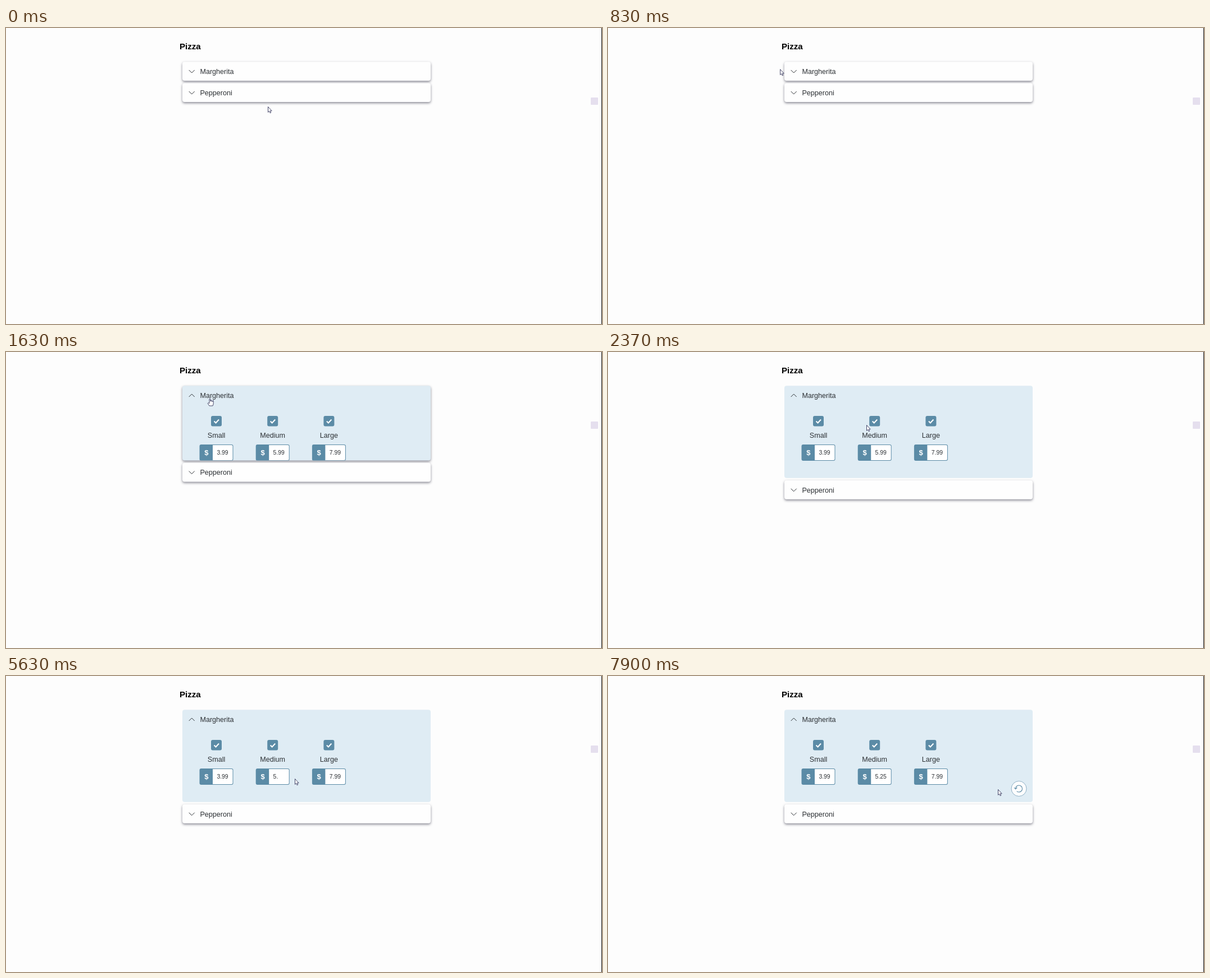
Write an HTML page with a canvas that moves like this. It is 1061 px wide and 528 px high and loops after 8000 ms.

```html
<!DOCTYPE html>
<html lang="en">
<head>
<meta charset="utf-8">
<title>Pizza menu</title>
<style>
html, body { margin: 0; width: 100%; height: 100%; overflow: hidden; background: #fdfdfd; }
canvas { display: block; }
</style>
</head>
<body>
<canvas id="stage" width="1061" height="528"></canvas>
<script>
const ctx = document.getElementById('stage').getContext('2d');
const LOOP = 8000;
const BLUE = '#5b8ba6', INK = '#2c3034';
const SANS = '"Liberation Sans", Arial, sans-serif';

// Keys are [time, value, value, ...], eased between neighbours.
const MOUSE = [
  [400, 466, 140], [600, 299, 72], [760, 299, 72], [1100, 362, 83],
  [1970, 362, 83], [2370, 460, 130], [2500, 466, 150], [2670, 466, 150],
  [2930, 480, 162], [3100, 480, 162], [3630, 496, 170], [3970, 496, 172],
  [4170, 514, 183], [7100, 514, 183], [7330, 650, 202], [7630, 650, 202],
  [7900, 694, 202]
];
const HOVER = [[490, 0], [560, .6], [600, .6], [720, 0], [880, 0], [1030, 1]];
const PRICES = [[0, '5.99'], [5300, '5.9'], [5570, '5.'], [6100, '5.2'], [6570, '5.25']];
const CARET = [[3630, 4500], [5030, 5630], [6100, 6830], [7100, 7630]];

const clamp = x => Math.min(1, Math.max(0, x));
const smooth = x => x * x * (3 - 2 * x);

function track(keys, t) {
  const i = keys.findIndex(k => k[0] > t);
  if (i === 0) return keys[0].slice(1);
  if (i < 0) return keys[keys.length - 1].slice(1);
  const a = keys[i - 1], b = keys[i];
  const p = smooth((t - a[0]) / (b[0] - a[0]));
  return a.slice(1).map((v, j) => v + (b[j + 1] - v) * p);
}

// The CSS "ease" curve.
function ease(x) {
  let lo = 0, hi = 1, s = 0;
  for (let i = 0; i < 20; i++) {
    s = (lo + hi) / 2;
    const bx = 3 * s * (1 - s) * (1 - s) * .25 + 3 * s * s * (1 - s) * .25 + s ** 3;
    if (bx < x) lo = s; else hi = s;
  }
  return 3 * s * (1 - s) * (1 - s) * .1 + 3 * s * s * (1 - s) + s ** 3;
}

function text(str, x, y, size, color = INK, align = 'left', weight = '') {
  ctx.font = `${weight} ${size}px ${SANS}`;
  ctx.textAlign = align;
  ctx.fillStyle = color;
  ctx.fillText(str, x, y);
}

function box(x, y, w, h, r, fill) {
  ctx.beginPath();
  ctx.roundRect(x, y, w, h, r);
  ctx.fillStyle = fill;
  ctx.fill();
}

function line(points, color, width) {
  ctx.beginPath();
  points.forEach(([x, y]) => ctx.lineTo(x, y));
  ctx.strokeStyle = color;
  ctx.lineWidth = width;
  ctx.stroke();
}

function panel(name, y, h, fill, open, shadow) {
  ctx.save();
  if (shadow) {
    ctx.shadowColor = 'rgba(40,40,60,.55)';
    ctx.shadowBlur = 4;
    ctx.shadowOffsetY = 2;
  }
  box(314, y, 442, h, 4, fill);
  ctx.restore();
  const tip = open ? 14.7 : 19.7, ends = open ? 19.7 : 14.7;
  line([[325.7, y + ends], [330.7, y + tip], [335.7, y + ends]], INK, 1);
  text(name, 345.4, y + 21.7, 12.6);
}

function size(i, label, price) {
  const x = 345 + i * 100.2, mid = x + 29.5;
  box(mid - 9.5, 114, 19, 18.5, 3, BLUE);
  line([[mid - 4, 123.5], [mid - 1, 126.5], [mid + 4.5, 120.5]], '#fff', 2);
  text(label, mid, 152.7, 12.6, INK, 'center');
  box(x - .5, 165, 60, 29, 3, BLUE);
  box(x + 23, 166, 35.5, 27, [0, 2, 2, 0], '#fff');
  text('$', x + 11.8, 184, 13, '#fff', 'center', 'bold');
  text(price, x + 30.4, 182.8, 10.4);
}

function resetButton(alpha) {
  ctx.save();
  ctx.globalAlpha = alpha;
  ctx.beginPath();
  ctx.arc(731.5, 201, 13.5, 0, 2 * Math.PI);
  ctx.fillStyle = '#fdfdfe';
  ctx.fill();
  ctx.strokeStyle = '#8fb0c5';
  ctx.lineWidth = 1;
  ctx.stroke();
  ctx.beginPath();
  ctx.arc(731.5, 201, 6, Math.PI, 2.72 * Math.PI);
  ctx.strokeStyle = BLUE;
  ctx.lineWidth = 1.1;
  ctx.stroke();
  line([[723, 199], [725.5, 201.7], [728.3, 199]], BLUE, 1.1);
  ctx.restore();
}

const ARROW = new Path2D('M0.5 .5V10.3L2.7 8.4L4.2 11.7L5.7 11L4.3 7.8H7.2Z');
const HAND = new Path2D('M0 1Q1.2-.6 2 1V5Q3-.0 4 5.1Q5.2 4 5.8 5.6Q7-.0 7.2 6V9Q7 11 6 13H0L-3 8.5Q-2.6 6.6 0 8.6Z');

function pointer(t) {
  if ((t >= 3970 && t < 4100) || (t >= 6570 && t < 7100)) return;
  const [x, y] = track(MOUSE, t);
  const inHeader = x > 314 && x < 756 && y > 60 && y < 94;
  ctx.save();
  ctx.translate(x, y);
  if (t >= 3300 && t < 3970) {
    line([[-2, -5], [2, -5]], INK, 1);
    line([[0, -5], [0, 10]], INK, 1);
    line([[-2, 10], [2, 10]], INK, 1);
  } else {
    const shape = inHeader ? HAND : ARROW;
    ctx.fillStyle = '#fff';
    ctx.strokeStyle = '#33345a';
    ctx.lineWidth = .9;
    ctx.fill(shape);
    ctx.stroke(shape);
  }
  ctx.restore();
}

function draw(t) {
  ctx.fillStyle = '#fdfdfd';
  ctx.fillRect(0, 0, 1061, 528);
  text('Pizza', 309, 38, 15.1, '#000', 'left', 'bold');

  const open = t >= 1470;
  const grow = 130.7 * ease(clamp((t - 1465) / 360));
  const [hover] = track(HOVER, t);
  const mix = (a, b) => Math.round(a + (b - a) * hover);
  const fill = `rgb(${mix(254, 223)},${mix(254, 236)},${mix(254, 244)})`;
  panel('Margherita', 60.3, 33.7 + grow, fill, open, t < 1830);

  if (open) {
    ctx.save();
    ctx.beginPath();
    ctx.rect(314, 94, 442, grow);
    ctx.clip();
    const price = PRICES.filter(p => p[0] <= t).pop()[1];
    size(0, 'Small', '3.99');
    size(1, 'Medium', price);
    size(2, 'Large', '7.99');
    if (CARET.some(([from, to]) => t >= from && t < to)) {
      ctx.font = `10.4px ${SANS}`;
      ctx.fillStyle = '#111';
      ctx.fillRect(Math.round(475.2 + ctx.measureText(price).width), 173, 1, 12);
    }
    if (t >= 7630) resetButton(clamp((t - 7600) / 120));
    ctx.restore();
  }
  panel('Pepperoni', 98.3 + grow, 33.7, '#fefefe', false, true);

  box(1041, 124, 13, 13, 1, '#e5dfee');
  ctx.fillStyle = '#111';
  ctx.fillRect(1060, 0, 1, 528);
  pointer(t);
}

const start = performance.now();
function tick() {
  draw((performance.now() - start) % LOOP);
  requestAnimationFrame(tick);
}
tick();
</script>
</body>
</html>
```
